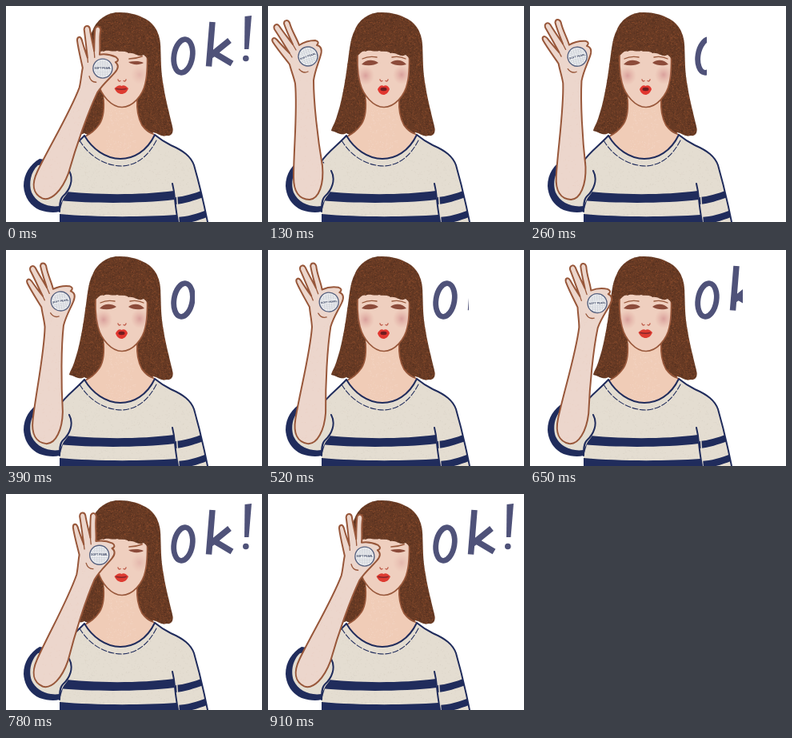
Recreate the animation shown at these times as an HTML page. Size 320 by 270 pixels, loop 1040 ms.

```html
<!DOCTYPE html>
<html lang="en">
<head>
<meta charset="utf-8">
<title>ok!</title>
<style>
html, body { margin: 0; width: 100%; height: 100%; overflow: hidden; background: #fff; }
svg { display: block; width: 100vw; height: 100vh; }
.line { fill: none; stroke-linecap: round; stroke-linejoin: round; }
.navy { stroke: #202c5c; }
.brown { stroke: #98573a; }
</style>
</head>
<body>
<svg viewBox="0 0 320 270">
  <defs>
    <path id="hairShape" d="M140 8C127 8 114 17 109 29C102 42 102 57 99 75C96 99 91 124 86 138C84 146 80 151 79 156C86 157 91 163 98 159L106 163L181 163L184 158C190 159 194 164 201 162C207 163 210 158 208 151C205 137 200 120 197 101C193 80 194 64 193 48C192 31 183 19 170 14C160 9 150 8 140 8Z"/>
    <path id="fringeShape" d="M107 53C108 29 121 13 140 10C166 9 186 25 189 58C188 64 184 67 181 70C177 67 176 64 172 61C166 65 160 57 153 59C149 55 144 58 139 56C132 58 127 54 122 57C118 55 115 60 112 62Z"/>
    <path id="bodyShape" d="M98 162C88 173 73 184 67 194L67 270L252 270C247 245 241 220 235 199C231 188 222 181 206 174C198 170 192 166 186 161C176 182 159 191 143 191C125 191 108 179 98 162Z"/>
    <path id="armShape" d="M32 214C32 180 37 130 34 97C32 88 29 81 27 73C20 64 11 53 6 45C4 41 7 38 11 42C17 49 22 54 27 59C20 48 14 38 8 29C6 24 11 21 14 25C20 34 26 41 31 48C27 39 23 31 20 22C20 17 25 17 27 21C30 32 36 40 39 49C45 45 53 43 59 43C63 44 64 46 61 49C66 50 68 54 66 61C63 72 59 79 57 93C57 120 62 165 68 200C70 222 64 241 52 242C39 242 32 232 32 214Z"/>
    <clipPath id="hairClip"><use href="#hairShape"/></clipPath>
    <clipPath id="fringeClip"><use href="#fringeShape"/></clipPath>
    <clipPath id="bodyClip"><use href="#bodyShape"/></clipPath>
    <clipPath id="armClip"><use href="#armShape"/></clipPath>
    <clipPath id="coinClip"><circle r="10.500"/></clipPath>
    <clipPath id="wordClip"><rect id="wipe" y="0" width="320" height="120"/></clipPath>
    <radialGradient id="blush">
      <stop offset="0" stop-color="#c98084" stop-opacity=".6"/>
      <stop offset="1" stop-color="#dc9a90" stop-opacity="0"/>
    </radialGradient>
  </defs>

  <use href="#hairShape" fill="#673a24"/>
  <g clip-path="url(#hairClip)" id="hairGrain"></g>

  <!-- neck and face -->
  <path d="M122 105C123 130 122 142 115 150C110 157 105 160 98 163C109 182 126 192 143 192C161 192 176 180 187 162C178 159 173 155 170 149C164 138 163 122 164 105Z" fill="#f0ccb7"/>
  <g id="neckGrain"></g>
  <path class="line brown" stroke-width="1.700" d="M122 117C123 131 122 142 115 150C110 157 105 160 99 163M164 116C163 130 165 140 170 149C174 155 179 158 186 161"/>
  <path class="brown" stroke-width="1.700" fill="#efcfbf" d="M113 48C111 66 112 84 115 96C119 112 132 126.500 145 126.500C158 126.500 171 112 174 97C177 84 177 66 176 48Z"/>
  <ellipse id="blushL" cx="122" cy="87" rx="11" ry="12" fill="url(#blush)"/>
  <ellipse id="blushR" cx="167" cy="86" rx="11" ry="12" fill="url(#blush)"/>
  <g id="eyesOpen" fill="#8c4b3a">
    <path d="M117 73C122 67 131 66 138 71C132 75 124 75 117 73ZM153 71C159 66 168 67 173 73C167 75 159 75 153 71Z"/>
    <path class="line brown" stroke-width="1.300" d="M118 66Q126 62 136 64M155 64Q164 62 172 66"/>
  </g>
  <g id="eyeWink" fill="#8c4b3a">
    <path d="M153 70C159 69 166 68 172 71C167 74 158 74 153 70Z"/>
    <path class="line brown" stroke-width="1.700" d="M154 66Q162 66 170 63"/>
  </g>
  <path class="line" stroke="#c0624f" stroke-width="1.400" d="M140 92Q141 95 143 93.500M147 93.500Q149 95 150 92"/>
  <g id="kiss">
    <path fill="#e1362f" d="M137 104C139 100 142 98 144.500 100C147 98 151 100 152 104C150 109 147 111 144.500 111C141 111 138 108 137 104Z"/>
    <ellipse cx="144.500" cy="104" rx="4" ry="2.200" fill="#701d20"/>
  </g>
  <g id="smile">
    <path fill="#dd3b31" d="M135.500 103C139 100 142 98 144.500 100C147 98 150 100 153 103C151 108 148 110 144.500 110C141 110 138 108 135.500 103Z"/>
    <path class="line" stroke="#85272a" stroke-width="1.600" d="M138 103.500Q145 105 150 103.500"/>
  </g>

  <use href="#fringeShape" fill="#673a24"/>
  <g clip-path="url(#fringeClip)" id="fringeGrain"></g>

  <!-- striped top -->
  <use href="#bodyShape" fill="#e4ddd1"/>
  <g clip-path="url(#bodyClip)">
    <g id="bodyGrain"></g>
    <path fill="#202c5c" d="M67 231C105 236 165 237 210 231L211 242C168 247 108 247 67 243ZM212 239C223 238 233 235 247 230L247 239C235 243 224 247 212 248ZM67 260C110 264 170 264 213 261L215 270L67 270ZM214 264C227 263 239 260 253 254L253 263C241 268 228 272 215 273Z"/>
    <path class="line" stroke="#e4ddd1" stroke-width="1.500" d="M213 230L216 270"/>
  </g>
  <path class="line navy" stroke-width="2" d="M98 162C108 179 125 191 143 191C159 191 176 182 186 161C192 166 198 170 206 174C222 181 231 188 235 199C241 220 247 245 252 270M98 162C88 173 73 184 67 194M208 222Q210 230 211 241T215 270"/>
  <path class="line navy" stroke-width="1.100" stroke-dasharray="7 2.500" d="M92 168C104 188 124 200 145 200C163 199 177 189 188 168"/>

  <!-- sleeve -->
  <path fill="#202c5c" d="M42 191C30 198 22 210 22 225C23 240 31 250 42 255C51 258 60 259 67 257L72 240L70 195Z"/>
  <path fill="#e4ddd1" d="M40 199C31 207 28 222 32 233C38 246 52 252 67 250L72 240C81 230 85 217 81 208L68 195Z"/>
  <path class="line navy" stroke-width="2" d="M79 206C85 217 80 230 71 238C67 242 67 250 67 257"/>

  <g id="arm">
    <use href="#armShape" fill="#ecd6cc"/>
    <g clip-path="url(#armClip)" id="armGrain"></g>
    <use href="#armShape" class="line brown" stroke-width="2"/>
    <path class="line brown" stroke-width="1.300" d="M39 79Q44 85 50 82M27 59L30 64M31 48L35 55"/>
    <g id="coin">
      <circle r="12" fill="#f1f2f3" stroke="#56617f" stroke-width="1.400"/>
      <g clip-path="url(#coinClip)">
        <path id="hatch" class="line" stroke="#cdd1d8" stroke-width=".8"/>
        <rect x="-11" y="-3" width="22" height="5" fill="#eceef0"/>
      </g>
      <text y="1" text-anchor="middle" font-family="Inter, Arial, sans-serif" font-weight="700" font-size="3.400" fill="#36405f">SOFT PEARL</text>
    </g>
  </g>

  <!-- hand-drawn word -->
  <g clip-path="url(#wordClip)">
    <g class="line" stroke="#4f5279">
      <ellipse cx="221.500" cy="62.500" rx="11.500" ry="21" transform="rotate(9 221.500 62.500)" stroke-width="6.800"/>
      <path stroke-width="7.500" stroke-linecap="butt" d="M258 20L253.500 75.500M279.500 43L256 62M259 58L282.500 72"/>
    </g>
    <path fill="#4f5279" d="M298.500 13L307 12L303.500 54L298 54Z"/>
    <circle cx="299.800" cy="65.500" r="3.800" fill="#4f5279"/>
  </g>
</svg>
<script>
const $ = id => document.getElementById(id);
const STEP = 130, COUNT = 8;
const PIVOT = [50, 227], COIN = [50, 63];

// one entry per step
const angles = [25.6, 0, 3.2, 6.4, 9.2, 12, 24, 25.6];
const tilts = [0, -20, -14, -9, -6, -3, 0, 0];

let seed = 7;
const rand = () => (seed = (seed * 16807) % 2147483647) / 2147483647;

function grain(id, [x, y, w, h], count, color, opacity) {
  let d = "";
  for (let i = 0; i < count; i++) {
    d += `M${(x + rand() * w).toFixed(1)} ${(y + rand() * h).toFixed(1)}h1`;
  }
  const p = document.createElementNS("http://www.w3.org/2000/svg", "path");
  p.setAttribute("d", d);
  p.setAttribute("stroke", color);
  p.setAttribute("stroke-opacity", opacity);
  $(id).append(p);
}

const hairBox = [78, 8, 132, 156], fringeBox = [106, 9, 84, 62];
grain("hairGrain", hairBox, 3600, "#9a5530", 0.55);
grain("hairGrain", hairBox, 3000, "#47281c", 0.5);
grain("fringeGrain", fringeBox, 900, "#9a5530", 0.55);
grain("fringeGrain", fringeBox, 750, "#47281c", 0.5);
grain("bodyGrain", [67, 163, 185, 107], 1200, "#d3cbbd", 0.4);
grain("neckGrain", [125, 128, 37, 60], 200, "#f6dccd", 0.5);
grain("armGrain", [6, 18, 64, 224], 500, "#e6c8b9", 0.4);

let lines = "";
for (let y = -10; y <= 10; y += 2.2) lines += `M-10 ${y.toFixed(1)}h20`;
for (let x = -9; x <= 9; x += 3) lines += `M${x} -10v20`;
$("hatch").setAttribute("d", lines);

const show = (id, on) => $(id).setAttribute("visibility", on ? "visible" : "hidden");

function draw(t) {
  const i = Math.floor(t / STEP) % COUNT;
  const away = i > 0 && i < 6;
  const lift = away ? 0 : -1;
  $("arm").setAttribute("transform", `translate(0 ${lift}) rotate(${angles[i]} ${PIVOT})`);
  $("coin").setAttribute("transform", `translate(${COIN}) rotate(${tilts[i] - angles[i]})`);
  $("wipe").setAttribute("width", away ? 191 + 15 * i : 320);
  show("eyesOpen", away);
  show("eyeWink", !away);
  show("kiss", away && i < 5);
  show("smile", !away || i === 5);
  show("blushL", away);
  $("blushR").setAttribute("opacity", away ? 1 : 0.5);
}

const start = performance.now();
function tick() {
  draw(performance.now() - start);
  requestAnimationFrame(tick);
}
tick();
</script>
</body>
</html>
```
